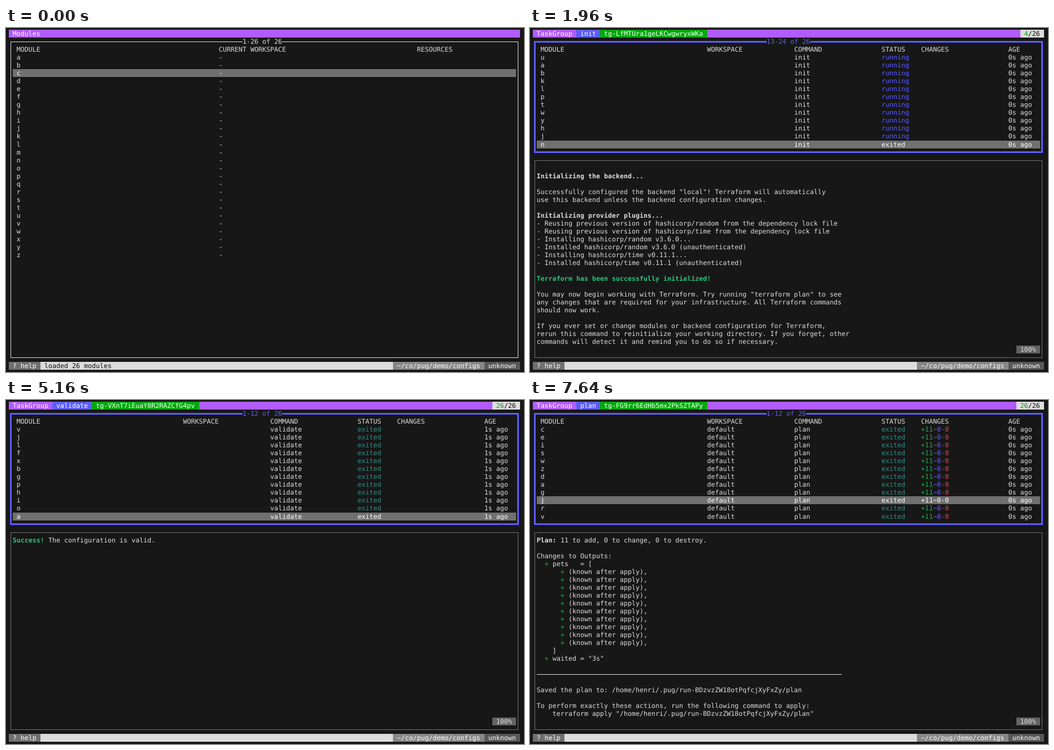
An HTML page for the animation above (8 s loop, 917 by 611 pixels).

```html
<!DOCTYPE html>
<html lang="en">
<head>
<meta charset="utf-8">
<title>Terminal demo</title>
<style>
html, body { margin: 0; width: 100%; height: 100%; overflow: hidden; background: #171717; }
#screen { position: relative; width: 917px; height: 611px; overflow: hidden; background: #171717; }
#screen * { position: absolute; box-sizing: border-box; }
#screen span {
  font: 11.654px/14px "DejaVu Sans Mono", monospace;
  text-rendering: geometricPrecision;
  font-variant-ligatures: none;
  white-space: pre;
}
#screen .b { font-weight: bold; }
</style>
</head>
<body>
<div id="screen"></div>
<script>
const LOOP = 8000, COLS = 129, CW = 7.016, CH = 14.036;
const C = {
  bg: '#171717', fg: '#dddddd', white: '#ffffff', black: '#101010',
  purple: '#b05cff', blue: '#5c5cff', green: '#00a80b', bar: '#dcdcdc',
  grey: '#707070', path: '#878787', dark: '#585858', dim: '#737373',
  picked: '#83acd4', current: '#87d7ff', teal: '#358d83',
  mint: '#23c77c', plus: '#25ad4b', red: '#dc4b4b'
};
const screen = document.getElementById('screen');
let html = '';

const px = c => 4.8 + c * CW;
const py = r => 3 + r * CH;
const edge = (mid, w) => Math.ceil(mid - w / 2 - 0.08);

function rect(x, y, w, h, color) {
  html += `<div style="left:${x}px;top:${y}px;width:${w}px;height:${h}px;background:${color}"></div>`;
}
function fill(c, r, n, color) {
  const x = Math.round(px(c)), y = Math.round(py(r));
  rect(x, y, Math.round(px(c + n)) - x, Math.round(py(r + 1)) - y, color);
}
function text(c, r, s, color = C.fg, bold = false) {
  html += `<span class="${bold ? 'b' : ''}" style="left:${px(c).toFixed(2)}px;top:${Math.round(py(r))}px;color:${color}">${s}</span>`;
}
function label(c, r, s, color, back) {
  fill(c, r, s.length, back);
  text(c, r, s, color);
}
function frame(r0, r1, color, w = 1) {
  const x = edge(px(0.5), w), y = edge(py(r0 + 0.5), w);
  const right = edge(px(128.5), w) + w, bottom = edge(py(r1 + 0.5), w) + w;
  html += `<div style="left:${x}px;top:${y}px;width:${right - x}px;height:${bottom - y}px;border:${w}px solid ${color}"></div>`;
}
function caption(s, color) {
  label(Math.floor((COLS - s.length) / 2), 1, s, color, C.bg);
}

function footer(message = '') {
  fill(0, 42, COLS, C.bar);
  label(0, 42, ' ? help ', C.white, C.grey);
  text(9, 42, message, C.black);
  label(97, 42, ' ~/co/pug/demo/configs ', C.white, C.path);
  label(120, 42, ' unknown ', C.white, C.dark);
}
const percent = () => label(122, 40, ' 100% ', C.fg, '#626262');

function modules({ picked = false, workspace = '-', message = '', split = false }) {
  fill(0, 0, COLS, C.purple);
  text(1, 0, 'Modules', C.white);
  if (split) {
    frame(1, 29, C.fg);
    frame(30, 41, C.fg);
    percent();
  } else frame(1, 41, C.fg);
  caption('1-26 of 26', C.fg);
  text(2, 2, 'MODULE');
  text(53, 2, 'CURRENT WORKSPACE');
  text(103, 2, 'RESOURCES');
  if (picked) {
    const y = Math.round(py(3)), x = Math.round(px(1));
    rect(x, y, Math.round(px(128)) - x, Math.round(py(29)) - y, C.picked);
  }
  fill(1, 5, 127, picked ? C.current : C.grey);
  [...'abcdefghijklmnopqrstuvwxyz'].forEach((m, i) => {
    const color = picked ? C.black : i === 2 ? C.white : C.fg;
    text(2, 3 + i, m, color);
    text(53, 3 + i, workspace, color);
  });
  footer(message);
}

const GROUPS = {
  init: 'tg-LfMTUra1geLKCwgwryxWKa',
  validate: 'tg-VXnT7iEuaY8R2RAZCfG4pv',
  plan: 'tg-FG9rr6EdHb5mx2PkSZTAPy'
};

function topBar(cmd, done) {
  fill(0, 0, COLS, C.purple);
  text(1, 0, 'TaskGroup', C.white);
  label(11, 0, ` ${cmd} `, C.white, C.blue);
  label(13 + cmd.length, 0, ` ${GROUPS[cmd]} `, C.white, C.green);
  const count = ` ${done}/26 `, c = COLS - count.length;
  label(c, 0, count, C.black, C.bar);
  fill(c + 1, 0, String(done).length, C.bar);
  text(c + 1, 0, done, C.green);
}
function heads() {
  [[2, 'MODULE'], [44, 'WORKSPACE'], [66, 'COMMAND'], [88, 'STATUS'], [98, 'CHANGES'], [120, 'AGE']]
    .forEach(([c, s]) => text(c, 2, s));
}

// Half-drawn page: the upper part of the table only.
function opening({ cmd, rows = 6 }) {
  topBar(cmd, 0);
  const y = edge(py(1.5), 3), h = Math.round(py(rows + 1)) - y;
  const left = edge(px(0.5), 3), right = edge(px(128.5), 3);
  rect(left, y, right + 3 - left, 3, C.blue);
  rect(left, y, 3, h, C.blue);
  rect(right, y, 3, h, C.blue);
  caption('1-1 of 0', C.blue);
  if (rows > 1) heads();
  footer();
}

function tasks({ cmd, done, title = '1-12 of 26', rows, sel, exited = () => true, aged = () => false, output, pane = 'full' }) {
  topBar(cmd, done);
  frame(1, 15, C.blue, 3);
  caption(title, C.blue);
  heads();
  [...rows].forEach((m, i) => {
    const r = 3 + i, on = i === sel, end = exited(i);
    const tint = color => on ? C.white : color;
    if (on) fill(1, r, 127, C.grey);
    text(2, r, m, tint(C.fg));
    if (cmd === 'plan') text(44, r, 'default', tint(C.fg));
    text(66, r, cmd, tint(C.fg));
    text(88, r, end ? 'exited' : 'running', tint(end ? C.teal : C.blue));
    if (cmd === 'plan' && end) {
      text(98, r, '+11', tint(C.plus));
      text(101, r, '~0', tint(C.blue));
      text(103, r, '-0', tint(C.red));
    }
    text(120, r, (aged(i) ? 1 : 0) + 's ago', tint(C.fg));
  });
  if (pane === 'full') {
    frame(16, 41, C.dim);
    if (output) output();
    percent();
  } else {
    const x = edge(px(0.5), 1), right = edge(px(128.5), 1);
    const bracket = (r, up, color, end = right + 1) => {
      const y = edge(py(r + 0.5), 1);
      rect(x, y, end - x, 1, color);
      rect(x, up ? y - 7 : y, 1, 8, color);
      if (end > right) rect(right, up ? y - 7 : y, 1, 8, color);
    };
    const part = pane === 'partial';
    bracket(16, false, C.dim, part ? 720 : undefined);
    if (part) bracket(30, false, C.fg);
    bracket(41, true, part ? C.fg : C.dim);
  }
  footer();
}

// Leading "*" is bold, "!" bold green; a lone plus sign is green.
function lines(list, r0 = 17) {
  list.forEach((s, i) => {
    const r = r0 + i;
    if (!s) return;
    if (s[0] === '*') return text(1, r, s.slice(1), C.fg, true);
    if (s[0] === '!') return text(1, r, s.slice(1), C.mint, true);
    const m = s.match(/^( +)\+ (.*)/);
    if (!m) return text(1, r, s);
    text(1 + m[1].length, r, '+', C.plus);
    text(3 + m[1].length, r, m[2]);
  });
}

const INIT = [
  '', '*Initializing the backend...', '',
  'Successfully configured the backend "local"! Terraform will automatically',
  'use this backend unless the backend configuration changes.', '',
  '*Initializing provider plugins...',
  '- Reusing previous version of hashicorp/random from the dependency lock file',
  '- Reusing previous version of hashicorp/time from the dependency lock file',
  '- Installing hashicorp/random v3.6.0...',
  '- Installed hashicorp/random v3.6.0 (unauthenticated)',
  '- Installing hashicorp/time v0.11.1...',
  '- Installed hashicorp/time v0.11.1 (unauthenticated)', '',
  '!Terraform has been successfully initialized!', '',
  'You may now begin working with Terraform. Try running "terraform plan" to see',
  'any changes that are required for your infrastructure. All Terraform commands',
  'should now work.', '',
  'If you ever set or change modules or backend configuration for Terraform,',
  'rerun this command to reinitialize your working directory. If you forget, other',
  'commands will detect it and remind you to do so if necessary.'
];
const PLAN_FILE = '/home/henri/.pug/run-BDzvzZW18otPqfcjXyFxZy/plan';
const SLEEP = [
  '', '  # time_sleep.wait will be created',
  '  + resource "time_sleep" "wait" {',
  '      + create_duration = "3s"',
  '      + id              = (known after apply)',
  '    }', '', ''
];
const CHANGES = [
  '', '', 'Changes to Outputs:', '  + pets   = [',
  ...Array(10).fill('      + (known after apply),'),
  '    ]', '  + waited = "3s"'
];
const SAVED = [
  'Saved the plan to: ' + PLAN_FILE, '',
  'To perform exactly these actions, run the following command to apply:',
  `    terraform apply "${PLAN_FILE}"`
];

function planOutput(saved) {
  const r = saved ? 17 : 25;
  if (!saved) lines(SLEEP);
  text(1, r, 'Plan:', C.fg, true);
  text(7, r, '11 to add, 0 to change, 0 to destroy.');
  lines(CHANGES, r);
  if (!saved) return;
  const x = Math.round(px(1));
  rect(x, edge(py(34.5), 1), Math.round(px(78)) - x, 1, C.fg);
  lines(SAVED, 36);
}
function valid() {
  text(1, 17, 'Success!', C.mint, true);
  text(10, 17, 'The configuration is valid.');
}

function init({ done, shown = 23, shift = 0, old = 0 }) {
  const rows = 'uabklptwyhj'.slice(shift) + 'zq'.slice(0, shift) + 'n';
  const ended = done < 5 ? 0 : Math.round(11 * done / 26);
  tasks({
    cmd: 'init', done, rows, sel: 11, title: `${13 + shift}-${24 + shift} of 26`,
    exited: i => i === 11 ? done > 0 : i >= 11 - ended,
    aged: i => i >= 12 - old,
    output: () => lines(INIT.slice(0, shown))
  });
}
function validate({ done = 26, at = 11, old = 0, pane, early = false }) {
  const rest = early ? 'oihpgbxfljv' : 'vjlfxbgphio';
  tasks({
    cmd: 'validate', done, sel: at, pane,
    rows: rest.slice(0, at) + 'a' + rest.slice(at),
    exited: i => i >= 12 * (1 - done / 26),
    aged: i => i >= 12 - old,
    output: done > 15 ? valid : null
  });
}
function plan({ done, saved = false }) {
  const order = 'ceiswzdagjrvbfhklmnopqtuxy', at = Math.round(9 * done / 26);
  const exited = i => i >= 12 * (1 - done / 26);
  const from = 9 - at;
  tasks({
    cmd: 'plan', done, sel: at, exited,
    rows: (order + order).slice(from, from + 12),
    output: exited(at) ? () => planOutput(saved) : null
  });
}

const steps = [
  [0, modules, { message: 'loaded 26 modules' }],
  [960, modules, { picked: true }],
  [1480, opening, { cmd: 'init' }],
  [1520, init, { done: 0, shown: 0 }],
  [1560, init, { done: 0, shown: 10 }],
  [1720, init, { done: 0, shown: 12 }],
  [1880, init, { done: 2 }],
  [1920, init, { done: 3 }],
  [1960, init, { done: 4 }],
  [2000, init, { done: 11 }],
  [2040, init, { done: 19 }],
  [2120, init, { done: 26 }],
  ...[2480, 2520, 2560, 2640, 2680, 2760].map((t, i) =>
    [t, init, { done: 26, shift: Math.min(i + 1, 2), old: 2 * i + 2 }]),
  [2960, opening, { cmd: 'validate', rows: 1 }],
  [3000, opening, { cmd: 'validate' }],
  ...[[3080, 0], [3120, 3], [3160, 7], [3200, 12], [3280, 16], [3360, 20], [3400, 24], [3480, 26]]
    .map(([t, done]) => [t, validate, { done, at: 5, early: true }]),
  [3760, validate, { at: 9 }],
  [4080, validate, {}],
  [4560, validate, { old: 6 }],
  [4600, validate, { old: 12 }],
  [5120, validate, { old: 12, pane: 'cleared' }],
  [5160, validate, { old: 12 }],
  [5680, modules, { picked: true, workspace: 'default' }],
  [6240, modules, { picked: true, workspace: 'default', split: true }],
  [6800, tasks, { cmd: 'plan', done: 0, title: '1-1 of 1', rows: 'g', sel: 0, exited: () => false, pane: 'partial' }],
  ...[0, 1, 2, 4, 6, 8, 10, 12, 15, 17, 20, 22, 24, 26].map((done, i) =>
    [i < 13 ? 6840 + 40 * Math.round(i * 1.45) : 7600, plan, { done }]),
  [7640, plan, { done: 26, saved: true }]
];

let shownStep = -1;
const start = performance.now();
function tick() {
  const t = (performance.now() - start) % LOOP;
  let k = steps.length - 1;
  while (steps[k][0] > t) k--;
  if (k !== shownStep) {
    shownStep = k;
    html = '';
    const [, scene, options] = steps[k];
    scene(options);
    screen.innerHTML = html;
  }
  requestAnimationFrame(tick);
}
tick();
</script>
</body>
</html>
```
